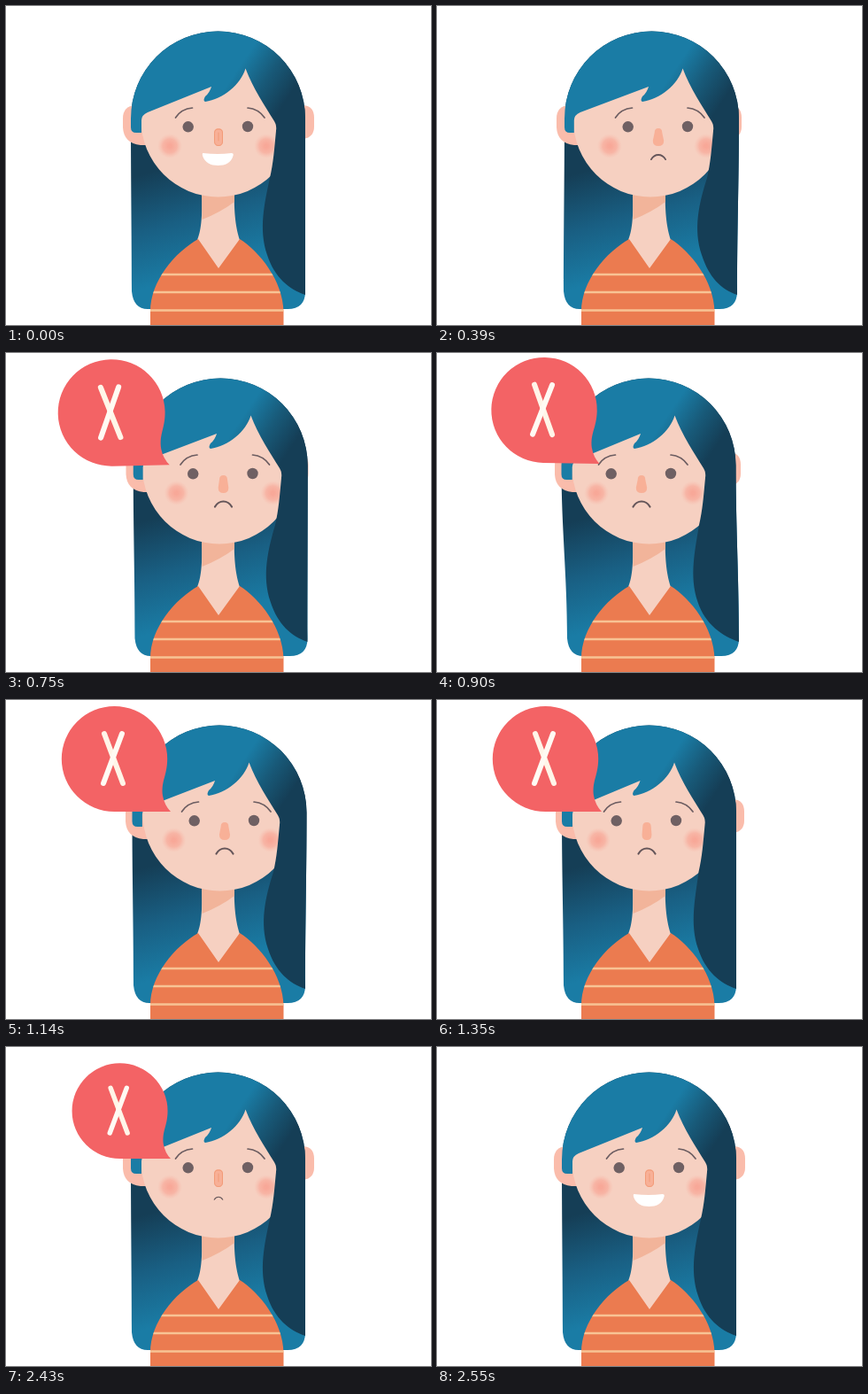
Write an HTML page with a canvas that moves like this. It is 480 px wide and 360 px high and loops after 2700 ms.

```html
<!DOCTYPE html>
<html lang="en">
<head>
<meta charset="utf-8">
<title>Shaking head</title>
<style>
  html, body { margin: 0; width: 100%; height: 100%; overflow: hidden; background: #fff; }
  canvas { display: block; width: 480px; height: 360px; }
</style>
</head>
<body>
<canvas id="stage"></canvas>
<script>
const LOOP = 2700, STEP = 30;
const canvas = document.getElementById('stage');
const ctx = canvas.getContext('2d');
const dpr = window.devicePixelRatio || 1;
canvas.width = 480 * dpr;
canvas.height = 360 * dpr;

const SKIN = '#f6d0c1', EAR = '#fabcab', LINE = '#6c5d61';
const BLUE = '#1a7ca5', DARK = '#153e56';

// Eased interpolation between key values
function track(t, times, vals) {
  if (t <= times[0]) return vals[0];
  for (let i = 1; i < times.length; i++) {
    if (t < times[i]) {
      const p = (t - times[i - 1]) / (times[i] - times[i - 1]);
      return vals[i - 1] + (vals[i] - vals[i - 1]) * (1 - Math.cos(p * Math.PI)) / 2;
    }
  }
  return vals[vals.length - 1];
}

const SWING = [180, 600, 900, 1140, 1350, 1560, 1800];
const POP = [480, 600, 690, 780, 900, 1140, 1350];

const swing = (t, ...mid) => track(t, SWING, [0, ...mid, 0]);

function fill(style, d) {
  ctx.fillStyle = style;
  ctx.fill(new Path2D(d));
}

function stroke(style, width, d) {
  ctx.strokeStyle = style;
  ctx.lineWidth = width;
  ctx.stroke(new Path2D(d));
}

function disc(style, x, y, r) {
  ctx.fillStyle = style;
  ctx.beginPath();
  ctx.arc(x, y, r, 0, Math.PI * 2);
  ctx.fill();
}

function ramp(x0, y0, x1, y1, ...colors) {
  const g = ctx.createLinearGradient(x0, y0, x1, y1);
  colors.forEach((c, i) => g.addColorStop(i / (colors.length - 1), c));
  return g;
}

function backHair(cap, left, right) {
  const l = 141 + cap, r = 338 + cap, bl = 142 + left, br = 338 + right;
  fill(ramp(172, 185, 206, 305, DARK, '#195f83', BLUE),
    `M${l} 127 A98.5 98.5 0 0 1 ${r} 127 C${r} 200 ${br} 250 ${br} 322
     Q${br} 342 ${br - 20} 342 H${bl + 18} Q${bl + 2} 342 ${bl} 322
     C${bl} 250 ${l} 200 ${l} 127 Z`);
}

function frontHair(cap, f, lock, right) {
  const l = 141 + cap, r = 338 + cap, e = 153 + cap * 0.6;
  fill(ramp(264 + f, 68, 318 + f, 104, BLUE, '#185a79', DARK),
    `M${l} 127 V137 Q${l} 143 ${l + 6} 143 H${e} V129 Q${e} 123 ${e + 7} 120
     L${232 + f} 91 Q${230 + f} 98 ${225 + f} 102 Q${222 + f} 107 ${225 + f} 108
     C${245 + f} 105 ${265 + f} 89 ${270.5 + f} 70.5
     C${279 + f} 93 ${292 + f} 112 ${303 + f} 130 Q${306 + f} 135 ${305 + f} 141
     C${303 + f} 162 ${302 + f} 177 ${298 + f} 194
     C${292 + lock} 222 ${285 + lock} 252 ${295 + lock} 281
     C${303 + lock} 306 ${320 + right} 320 ${338 + right} 326
     C${338 + right} 250 ${r} 200 ${r} 127 A98.5 98.5 0 0 0 ${l} 127 Z`);
}

function body() {
  fill(SKIN, 'M221 205 H258 C257 235 260 252 264 264 L241 300 L216 264 C221 252 222 235 221 205 Z');
  fill('#f2b49a', 'M221 205 H258 V221 Q242 233 221.5 241 Z');
  const shirt = new Path2D(`M163 360 V345 C163 310 191 278 217 263 L240 296 L264 263
    C286 277 313 310 313.5 345 V360 Z`);
  ctx.save();
  ctx.clip(shirt);
  ctx.fillStyle = '#eb7b50';
  ctx.fillRect(160, 255, 160, 105);
  stroke('#f8c394', 2.4, 'M160 303 H320 M160 323 H320 M160 343.5 H320');
  ctx.restore();
}

function cheek(x, y) {
  const g = ctx.createRadialGradient(x, y, 2, x, y, 14);
  g.addColorStop(0, 'rgba(248,166,150,.95)');
  g.addColorStop(0.5, 'rgba(248,172,156,.75)');
  g.addColorStop(1, 'rgba(248,190,175,0)');
  disc(g, x, y, 14);
}

function nose(h) {
  const x = 240 + h, turn = Math.min(Math.abs(h) / 8, 1);
  const low = 5 + turn * 1.2, top = 5 - turn * 0.7;
  fill('#f8b097', `M${x - top} 143 Q${x - top} 138 ${x} 138 Q${x + top} 138 ${x + top} 143
    L${x + low} 152 Q${x + low} 158 ${x} 158 Q${x - low} 158 ${x - low} 152 Z`);
  ctx.globalAlpha = Math.max(0, 1 - Math.abs(h) / 2);
  stroke('#f29b78', 1, `M${x - 4.5} 143 Q${x - 4.5} 139 ${x} 139 Q${x + 4.5} 139 ${x + 4.5} 143
    V153 Q${x + 4.5} 157.5 ${x} 157.5 Q${x - 4.5} 157.5 ${x - 4.5} 153 Z M${x} 143 V152`);
  ctx.globalAlpha = 1;
}

function scaled(x, y, s, draw) {
  if (s < 0.01) return;
  ctx.save();
  ctx.translate(x, y);
  ctx.scale(s, s);
  draw();
  ctx.restore();
}

function mouth(t, h) {
  const smile = track(t, [180, 330, 2460, 2550], [1, 0, 0, 1]);
  const frown = track(t, [300, 420, 2400, 2460], [0, 1, 1, 0]);
  scaled(239.5 + h, 172, smile, () =>
    fill('#fff', 'M-17 -6 Q0 -4 15 -6 Q18 -6 17 -3 C15 5 8 8 0 8 C-8 8 -15 5 -17.5 -3 Q-18 -6 -17 -6 Z'));
  scaled(240 + h, 171, frown, () =>
    stroke('#65565a', 2.2, 'M-9.5 2.5 Q-6 -3.5 0 -3.5 Q6 -3.5 9.5 2.5'));
}

function features(t, h, c) {
  cheek(185 + c, 158);
  cheek(294 + c, 158);
  disc('#6f6063', 205.7 + h, 136.3, 6.2);
  disc('#6f6063', 273 + h, 136, 6.2);
  stroke(LINE, 1.7, `M${191.5 + h} 126 Q${198 + h} 116 ${210.5 + h} 115
    M${273 + h} 115 Q${285 + h} 116 ${292 + h} 126`);
  nose(h);
  mouth(t, h);
}

// The bubble grows and turns around the tip of its tail
function bubble(t) {
  const s = t < 2400
    ? track(t, POP, [0, 0.585, 1.02, 1.01, 1, 1, 1])
    : track(t, [2400, 2550], [1, 0]);
  if (s < 0.01) return;
  ctx.save();
  ctx.translate(
    track(t, POP, [206, 202, 187, 184, 183.5, 186, 186]),
    track(t, POP, [152, 147, 127, 126, 125, 126, 126]));
  ctx.rotate(track(t, POP, [-22, -11, 4, -3, 1, 0, 0]) * Math.PI / 180);
  ctx.scale(s, s);
  ctx.translate(-186, -126);
  fill('#f36365', `M122.5 126 A59.7 59.5 0 1 1 182.2 66.5 C182 86 175 91 177 108
    Q179 119 186 126 Z`);
  stroke('#fff5e8', 6, 'M111 38 L132 94');
  stroke('#fffaf3', 6, 'M131 38 L110 94');
  ctx.restore();
}

function draw(t) {
  const h = swing(t, 20, -9, 7, -3, 1.2);
  const c = swing(t, 20, -5, 4.5, -3, 1);
  const f = swing(t, 14, -2, 4, -2.5, 1);
  const cap = swing(t, 6, -0.5, 1.5, 0, 0);
  const face = swing(t, 3, 0, 2, 0, 0);
  const left = swing(t, 2, 5, 2, 1, 0);
  const right = swing(t, 2, 3, 0, 0, 0);
  const lock = swing(t, 8, -0.5, 1, 0, 0);
  const earL = swing(t, 6, 1, 3, 2, 1);
  const earR = swing(t, -8, -5, -9, -1, 0);

  ctx.setTransform(dpr, 0, 0, dpr, 0, 0);
  ctx.lineCap = ctx.lineJoin = 'round';
  ctx.fillStyle = '#fff';
  ctx.fillRect(0, 0, 480, 360);

  const ex = 348 + earR;
  fill(EAR, `M${ex - 20} 112 H${ex - 12} Q${ex} 113 ${ex} 126 V136 Q${ex} 148 ${ex - 12} 150 H${ex - 20} Z`);
  backHair(cap, left, right);
  const el = 132 + earL;
  fill(EAR, `M${el + 26} 112 H${el + 14} Q${el} 113 ${el} 127 V137 Q${el + 1} 155 ${el + 20} 157 H${el + 28} Z`);
  body();
  disc(SKIN, 239.5 + face, 128.5, 87);
  features(t, h, c);
  frontHair(cap, f, lock, right);
  bubble(t);
}

const start = performance.now();
function tick() {
  const t = (performance.now() - start) % LOOP;
  draw(Math.floor(t / STEP) * STEP);
  requestAnimationFrame(tick);
}
tick();
</script>
</body>
</html>
```
